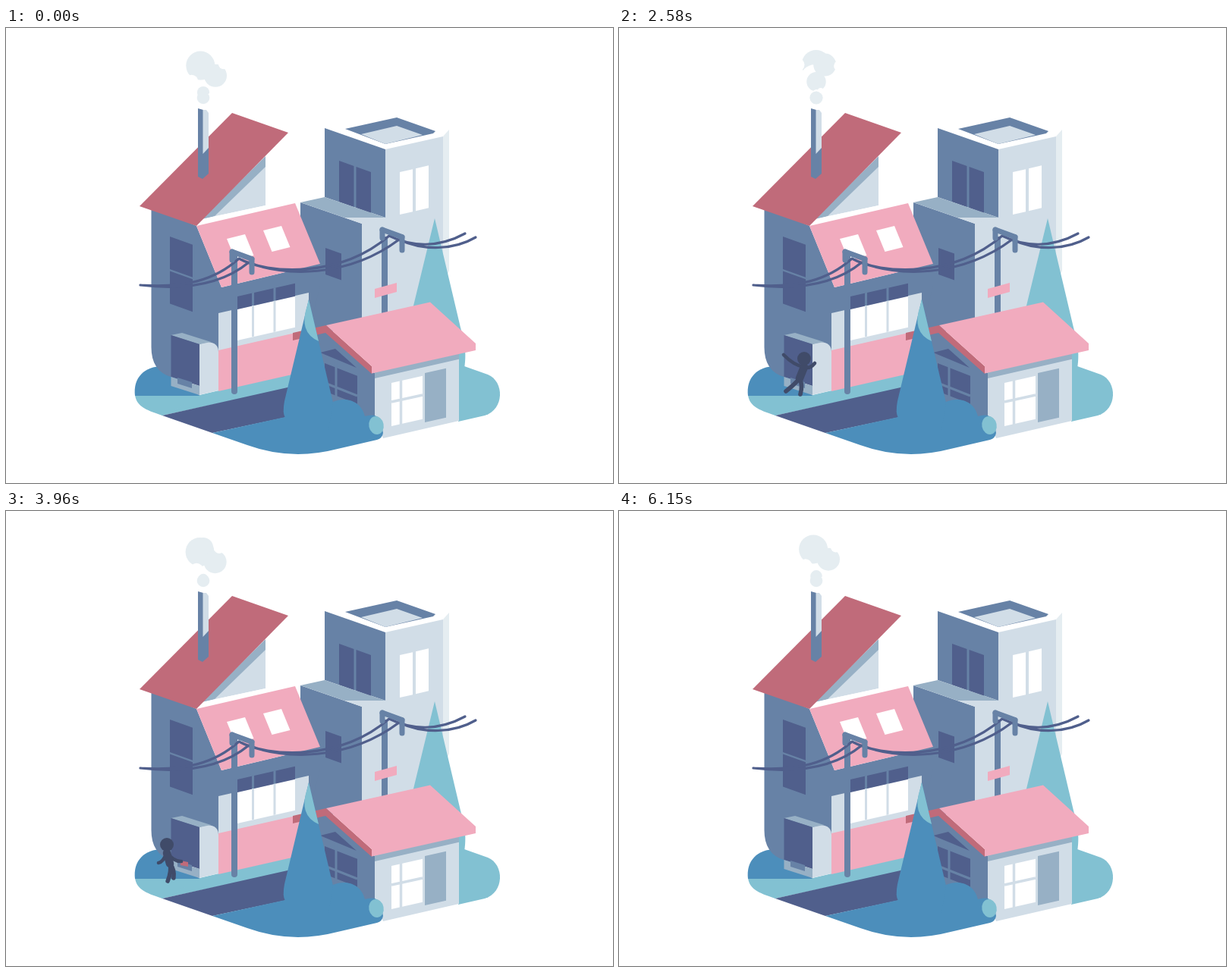
An HTML page with a canvas that plays this animation: 800x600 px, repeating every 6180 ms.

```html
<!DOCTYPE html>
<html lang="en">
<head>
<meta charset="utf-8">
<title>Little town</title>
<style>
html, body { margin: 0; width: 100%; height: 100%; overflow: hidden; background: #fff; }
canvas { display: block; }
</style>
</head>
<body>
<canvas id="stage" width="800" height="600"></canvas>
<script>
const ctx = document.getElementById('stage').getContext('2d');
const LOOP = 6180, PUFF_LOOP = LOOP / 3, PUFF_LIFE = 2480;
const SLATE = '#6782a6', DARK = '#505f8c', LIGHT = '#d1dde7', MID = '#97b0c5',
  PINK = '#f1abbe', RED = '#c06b7a', TEAL = '#82c1d2', BLUE = '#4c8ebb',
  MIST = '#e5edf1', WHITE = '#fff', INK = '#404b69';
// Slopes of walls facing left and right.
const L = .357, R = -.227;

const clamp = k => Math.max(0, Math.min(1, k));
const linear = (t, a, b) => clamp((t - a) / (b - a));
const ease = (t, a, b) => { const k = linear(t, a, b); return k * k * (3 - 2 * k); };
const mix = (a, b, k) => a.map((v, i) => v + (b[i] - v) * k);
const add = (a, b) => a.map((v, i) => v + b[i]);

const fill = (color, d) => { ctx.fillStyle = color; ctx.fill(new Path2D(d)); };
const poly = (color, pts) => fill(color, `M${pts}Z`);
const pane = (color, x, y, w, h, slope) =>
  fill(color, `M${x} ${y}l${w} ${w * slope}v${h}l${-w} ${-w * slope}Z`);
const line = (color, width, d, cap = 'butt') => {
  ctx.strokeStyle = color;
  ctx.lineWidth = width;
  ctx.lineCap = cap;
  ctx.lineJoin = 'round';
  ctx.stroke(new Path2D(d));
};
const dot = (color, x, y, r) => {
  ctx.fillStyle = color;
  ctx.beginPath();
  ctx.arc(x, y, r, 0, Math.PI * 2);
  ctx.fill();
};

const puffs = [
  { start: -250, size: 13, drift: 0 },
  { start: 520, size: 19, drift: -5 },
  { start: 1000, size: 15, drift: 16 }
];

// Puffs rise and grow, then a white circle climbs into them from below.
function drawSmoke(t) {
  const live = puffs.flatMap(puff => [-1, 0, 1].map(turn =>
    ({ ...puff, age: t % PUFF_LOOP + turn * PUFF_LOOP - puff.start })))
    .filter(({ age }) => age > 0 && age < PUFF_LIFE)
    .sort((a, b) => b.age - a.age);
  for (const { age, size, drift } of live) {
    const r = size * (.45 + .55 * linear(age, 0, 800));
    const x = 260 + drift * Math.sin(Math.PI * clamp(age / 2100));
    const y = Math.max(48, 92 - age * .0275);
    const eaten = linear(age, 1500, PUFF_LIFE);
    const angle = drift / 5 + age / 500;
    dot(MIST, x, y, r);
    dot(WHITE, x + r * 1.25 * Math.cos(angle), y + r * 1.25 * Math.sin(angle), r * .45);
    if (eaten) dot(WHITE, x - eaten * 3, y + 2.4 * r * (1 - eaten), r * (.9 + .2 * eaten));
  }
  dot(MIST, 260, 92, 8.3);
}

function drawTown() {
  // ground
  fill(TEAL, 'M596 446H604L635 457C657 466 657 503 631 511L596 519Z');
  poly(TEAL, '170,484 255,484 400,450 372,475 206,511');
  fill(TEAL, 'M170 484C172 498 182 503 206 511L260 484Z');
  fill(BLUE, 'M170 485C167 461 183 446 206 446L230 455 255 485Z');
  poly(DARK, '206,511 380,472 380,511 272,534');

  // tower
  poly(MIST, '576,143 584,134 584,320 576,340');
  poly(LIGHT, '469,250 500,250 500,160 576,143 576,400 469,400');
  poly(SLATE, '420,132 500,160 500,250 420,223');
  poly(SLATE, '447,133 515,118 566,136 563,139 500,153');
  poly(LIGHT, '468,140 515,129 549,141 500,153');
  for (const x of [439, 461.5]) pane(DARK, x, 175 + (x - 439) * L, 19.5, 54, L);
  for (const x of [519, 540]) pane(WHITE, x, 190 + (x - 519) * R, 17, 56, R);
  poly(SLATE, '388,230 469,258 469,400 388,400');
  poly(MID, '388,230 420,223 500,250 446,250');
  poly(LIGHT, '446,250 500,250 469,258');
  pane(DARK, 421, 290, 21, 35, L);

  // left house
  fill(SLATE, 'M191.500 235L251 261 284 342 414 311V340L399 400 280 430V475L217 460Q191.500 452 191.500 421Z');
  poly(LIGHT, '342,181 342,234 258,252');
  poly(MID, '342,169 342,183 275,248 257,253');
  poly(WHITE, '251,261 258,252 342,234 381,230 381,233');
  poly(PINK, '251,261 381,231 414,311 284,342');
  for (const x of [291, 339]) fill(WHITE, `M${x} ${278 + (x - 291) * R}l24 -6 11.500 28 -24 6Z`);
  poly(RED, '176,235 298,112 372,138 251,261');
  poly(SLATE, '253,106 260,108 267,150 267,192 259,199 253,196');
  poly(LIGHT, '259.5,108 264,108 267,112 267,158 259.5,166');
  for (const y of [275, 320.5]) pane(DARK, 216, y, 30, 43, L);
  pane(LIGHT, 280, 376, 119, 50, R);
  pane(PINK, 280, 425, 119, 54, R);
  pane(WHITE, 305, 371, 76, 41, R);
  pane(DARK, 305, 354, 76, 17, R);
  for (const x of [325.5, 354]) {
    pane(SLATE, x - 1.5, 354 + (x - 305) * R, 3, 17, R);
    pane(LIGHT, x - 1.5, 371 + (x - 305) * R, 3, 41, R);
  }
}

function drawStreet() {
  fill(TEAL, 'M565 251L599 395C607 422 606 435 604 450H530V395Z');
  line(SLATE, 8, 'M499 275V385');
  pane(SLATE, 486, 344, 0, 0, 0);
  pane(PINK, 486, 344, 29, 12, -.28);
  line(SLATE, 8, 'M301 300V440');
  line(SLATE, 8, 'M301 430V479', 'round');
  line(DARK, 3.2, 'M177 339C235 343 275 333 307 304C345 325 440 330 505 274C535 289 570 290 605 271' +
    'M177 339C235 346 285 338 320 309C365 328 450 330 518 279C550 294 590 293 619 276', 'round');
  for (const [x, y] of [[298, 295], [496, 266]]) {
    line(SLATE, 7, `M${x} ${y}l26 9.500`, 'round');
    line(SLATE, 7, `M${x} ${y}v11M${x + 26} ${y + 10}v17`, 'round');
  }
}

function drawMachine(tilt) {
  ctx.save();
  ctx.translate(255, 484);
  ctx.rotate(tilt * 5 * Math.PI / 180);
  ctx.translate(-255, -484);
  fill(LIGHT, 'M254 417L266 414Q280 415 280 427V478L254 484Z');
  fill(MID, 'M217.500 405L232 402 270 414 255 417Z');
  pane(DARK, 217.5, 405, 37.5, 55, .32);
  pane(MID, 217.5, 460, 37.5, 12, .32);
  pane(SLATE, 226, 461, 19, 8, .32);
  ctx.restore();
}

function drawFront() {
  // cottage
  poly(SLATE, '408,402 422,398 486,455 486,517 420,495');
  poly(DARK, '414,428 434,423 462,448');
  pane(DARK, 420, 442, 43, 37, .39);
  line(SLATE, 3, 'M435 440V492M420 468L463 485');
  poly(LIGHT, '486,461 597,436 597,518 497,541 486,517');
  pane(MID, 486, 454, 111, 8, R);
  pane(MID, 552, 455, 28, 65, R);
  pane(WHITE, 508, 468, 41, 57, R);
  line(LIGHT, 3.5, 'M520.500 460V525M508 493L549 484');
  poly(RED, '378,402 422,392 482,446 482,456 421,402 378,412');
  poly(PINK, '422,392 559,361.500 619,416 619,425 482,455.500 482,446');
  // lawn, bush and tree
  fill(BLUE, 'M272 534L368 513 431 493C447 486 468 491 473 512Q489 507 494 518L497 534Q496 541 489 543L437 555Q376 571 318 550Z');
  ctx.fillStyle = TEAL;
  ctx.beginPath();
  ctx.ellipse(488, 524, 9.7, 12, -.2, 0, Math.PI * 2);
  ctx.fill();
  fill(BLUE, 'M399 358L431 494 425 530H385L368 514Q364 508 367 492Z');
  fill(TEAL, 'M399 358L412 413Q385 401 397 366Z');
}

// Peeks out, jumps in front, shakes the machine, takes a can and walks off.
function drawPerson(t, tilt) {
  const peek = ease(t, 250, 450) - ease(t, 950, 1150);
  const lurk = 1 - ease(t, 1600, 1800);
  const push = ease(t, 1600, 1800) - ease(t, 3600, 3760);
  const reach = ease(t, 3700, 3900) - ease(t, 4600, 4800);
  const drink = ease(t, 4080, 4240) - ease(t, 4500, 4650);
  const back = ease(t, 3640, 3900), leave = linear(t, 5000, 5680);

  const x = 238 - 10 * lurk - 18 * peek - 24 * ease(t, 1800, 1890) + 30 * ease(t, 2050, 2400)
    - 32 * back + 188 * linear(t, 4700, 5680) ** 1.55;
  const y = 421 + 16 * lurk + 15 * ease(t, 2050, 2350) + 4 * back
    + 14 * Math.sin(Math.PI * leave) - 8 * leave;
  const swing = Math.cos(Math.PI * (x - 234) / 60);
  const side = 18 * lurk;

  const shoulder = [side, 11];
  const hip = mix([4 + side, 25 - 4 * lurk], [-6, 26], push);
  const heave = [4 * tilt, 2 * tilt];
  const arm = dx => [dx + side, 14 - .5 * dx];
  const leg = dx => [5 + dx + side, 44 - 16 * lurk];
  const grip = mix([19, 22], [9, 5], drink);
  const hands = [
    mix(mix(arm(-11 * swing), [-11, 24], reach), add([-27, -5], heave), push),
    mix(mix(arm(12 * swing), grip, reach), add([14, 6], heave), push)
  ];
  const feet = [
    mix(add(leg(-9.5 * swing), [0, 4 * reach]), [-24, 43], push),
    mix(leg(9.5 * swing), [-5, 47], push)
  ];

  ctx.save();
  ctx.translate(x, y);
  if (t > 3850 && t < 4700) pane(RED, hands[1][0] - 1, hands[1][1] - 1, 10, 6, .2);
  const limb = (from, to, width, bend) =>
    line(INK, width, `M${from}Q${add(mix(from, to, .5), bend)} ${to}`, 'round');
  for (const hand of hands) limb(shoulder, hand, 4.6, [0, 6]);
  for (const foot of feet) limb(hip, foot, 5.6, [4, -2]);
  line(INK, 10.5, `M${shoulder}L${hip}`, 'round');
  dot(INK, 0, 0, 9);
  ctx.restore();
}

function draw(t) {
  const tilt = t > 2680 && t < 3640 ? Math.sin(Math.PI * (t - 2680) / 320) ** 2 : 0;
  ctx.fillStyle = WHITE;
  ctx.fillRect(0, 0, 800, 600);
  drawSmoke(t);
  drawTown();
  drawStreet();
  if (t < 2000) drawPerson(t, tilt);
  drawMachine(tilt);
  if (t >= 2000 && t < 5680) drawPerson(t, tilt);
  drawFront();
}

const start = performance.now();
function tick() {
  draw((performance.now() - start) % LOOP);
  requestAnimationFrame(tick);
}
tick();
</script>
</body>
</html>
```
